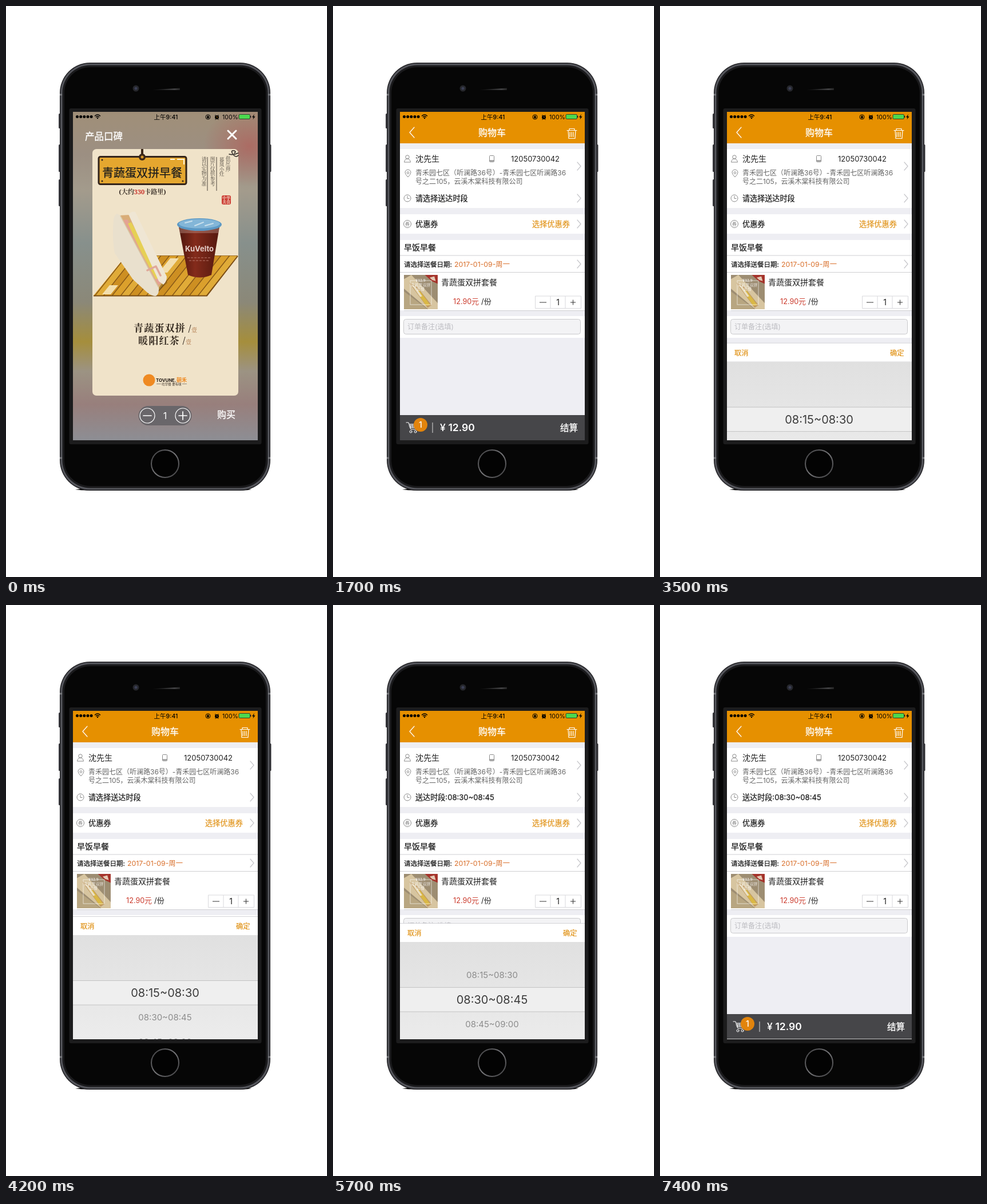
An HTML page for the animation above (7500 ms loop, 561 px wide and 998 px high).

```html
<!DOCTYPE html>
<html lang="zh-CN">
<head>
<meta charset="utf-8">
<title>购物车</title>
<style>
html, body { margin: 0; width: 100%; height: 100%; overflow: hidden; background: #fff; }
svg { display: block; width: 100vw; height: 100vh; }
text { font-family: Inter, "Noto Sans CJK SC", "Noto Sans CJK", sans-serif; white-space: pre; }
.serif { font-family: "Noto Serif", "Noto Serif CJK SC", "Noto Sans CJK SC", "Noto Sans CJK", serif; }
.mid { text-anchor: middle; }
.med { font-weight: 500; }
.bold { font-weight: 700; }
.white { fill: #fff; stroke: #fff; stroke-width: .3; }
.ink { fill: #1d1d1d; stroke: #1d1d1d; stroke-width: .25; }
.gold { fill: #e09114; stroke: #e09114; stroke-width: .2; }
.line { fill: none; stroke-linecap: round; stroke-linejoin: round; }
.icon { fill: none; stroke: #8b8b8b; stroke-width: 1; }
.down { writing-mode: vertical-rl; }
</style>
</head>
<body>
<svg viewBox="0 0 561 998">
<defs>
  <clipPath id="screen"><rect x="117" y="185" width="323" height="574"/></clipPath>
  <clipPath id="mat"><path d="M210 436H405L351 506H153Z"/></clipPath>
  <clipPath id="wheel"><rect x="117" y="577" width="323" height="182"/></clipPath>
  <linearGradient id="blur" x2="0" y2="1">
    <stop offset="0" stop-color="#a08f78"/><stop offset=".13" stop-color="#9c8f82"/>
    <stop offset=".24" stop-color="#a39b8c"/><stop offset=".4" stop-color="#87908c"/>
    <stop offset=".58" stop-color="#8b8878"/><stop offset=".7" stop-color="#a58e3c"/>
    <stop offset=".79" stop-color="#9c9383"/><stop offset=".89" stop-color="#987f7c"/>
    <stop offset="1" stop-color="#8d8e94"/>
  </linearGradient>
  <radialGradient id="rosy">
    <stop offset="0" stop-color="#b0605a" stop-opacity=".75"/><stop offset="1" stop-color="#b0605a" stop-opacity="0"/>
  </radialGradient>
  <linearGradient id="tan" x2="0" y2="1"><stop offset="0" stop-color="#b09d82"/><stop offset="1" stop-color="#ccb48e"/></linearGradient>
  <linearGradient id="drum" x2="0" y2="1"><stop offset="0" stop-color="#e0e0e0"/><stop offset="1" stop-color="#ececec"/></linearGradient>
  <linearGradient id="tea"><stop offset="0" stop-color="#4d160d"/><stop offset=".4" stop-color="#842b1b"/><stop offset="1" stop-color="#54190f"/></linearGradient>
  <linearGradient id="ring" x2="1" y2="1"><stop offset="0" stop-color="#3c3c3e"/><stop offset=".5" stop-color="#77777a"/><stop offset="1" stop-color="#3c3c3e"/></linearGradient>
  <linearGradient id="slit"><stop offset="0" stop-color="#111"/><stop offset=".8" stop-color="#444446"/><stop offset="1" stop-color="#222"/></linearGradient>
  <symbol id="snack" viewBox="0 0 100 100" preserveAspectRatio="none">
    <rect width="100" height="100" fill="#9d8d72"/>
    <path d="M0 12 22 0 100 82V100H72L0 40Z" fill="#d7c5a0"/>
    <path d="M0 48 70 100H0Z" fill="#b8a681"/>
    <path d="M15 22 40 36 82 88 70 96Z" fill="#c09a63"/>
    <path d="M30 38 48 48 78 88 66 90Z" fill="#d9b845"/>
    <path d="M22 28 34 34 54 62 48 64Z" fill="#eadfc4"/>
    <path d="M62 0H100V26L82 18Z" fill="#a5332b"/>
    <path d="M76 8 90 4 94 18 84 15Z" fill="#e4c9b4"/>
  </symbol>
  <path id="more" d="m-3-7 6 7-6 7" class="line" stroke="#c6c6ca" stroke-width="1.2"/>
</defs>

<!-- phone body -->
<g fill="#3c3c41">
  <rect x="92" y="188" width="4" height="26" rx="1.5"/><rect x="92" y="242" width="4" height="48" rx="1.5"/>
  <rect x="92" y="303" width="4" height="47" rx="1.5"/><rect x="459" y="242" width="4.5" height="48" rx="1.5"/>
</g>
<path d="M121 845q20-3 40 0-20 3-40 0M398 845q15-3 31 0-15 3-31 0" fill="#000"/>
<rect x="94" y="99" width="368" height="748" rx="53" fill="#1f1f22"/>
<rect x="95.500" y="100.500" width="365" height="745" rx="51.500" fill="#55565c"/>
<rect x="98.500" y="103.500" width="359" height="739" rx="48.500" fill="#1a1a1c"/>
<rect x="102" y="107" width="352" height="732" rx="45" fill="#060606"/>
<path d="M94 155h4M458 155h4M94 790h4M458 790h4" stroke="#77787c" stroke-width="3"/>
<rect x="110.500" y="179" width="336" height="587" rx="3" fill="#1c1c1d"/>
<circle cx="227" cy="144" r="5.500" fill="#26272c"/><circle cx="227" cy="144" r="2.500" fill="#3b3f55"/>
<path d="M255 146.500 304 143.500V147Z" fill="url(#slit)"/>
<circle cx="278" cy="800" r="24" fill="#030303" stroke="url(#ring)" stroke-width="2"/>

<g clip-path="url(#screen)">
  <g id="home">
    <rect x="117" y="185" width="323" height="574" fill="#fafafa"/>
    <path d="M117 185H440V500Q278 472 117 500Z" fill="url(#tan)"/>
    <text x="278" y="224" font-size="16.500" class="mid" fill="#fff">云溪市</text>
    <rect x="117" y="255" width="83" height="146" fill="#a2b497"/>
    <rect x="356" y="255" width="84" height="146" fill="#b79a78"/>
    <use href="#snack" x="214" y="242" width="128" height="172"/>
    <rect x="239" y="268" width="78" height="123" fill="none" stroke="#fff"/>
    <g class="mid" fill="#fff" font-size="16">
      <text x="278" y="274" class="serif">¥12.9</text>
      <text x="278" y="295" class="serif">青蔬蛋双拼</text>
      <text x="278" y="311" class="serif">套餐</text>
    </g>
    <text x="278" y="438" font-size="13" class="mid" fill="#fff">周一推荐: 青蔬蛋双拼套餐</text>
    <rect x="238" y="473" width="80" height="29" rx="14.500" fill="#f29a08"/>
    <text x="278" y="493" font-size="15" class="mid" fill="#fff">购买</text>
    <text x="263" y="531" font-size="12" fill="#c4281c">22份</text>
    <rect x="117" y="547" width="323" height="108" fill="#f0cf4f"/>
    <path d="M117 627q35-18 75 5t95-10 153 10V655H117Z" fill="#dcb437"/>
    <ellipse cx="251" cy="575" rx="25" ry="17" fill="#28282b"/>
    <g class="bold" stroke="#2a211c" stroke-width="6" paint-order="stroke" stroke-linejoin="round">
      <text x="186" y="611" font-size="29" fill="#d94a3a">小</text>
      <text x="214" y="611" font-size="29" fill="#f4d45a">钱</text>
      <text x="245" y="606" font-size="19" fill="#d98a62">变</text>
      <text x="264" y="611" font-size="29" fill="#f4d45a">大钱</text>
      <text x="186" y="627" font-size="16.500" fill="#fff3cd">充值<tspan fill="#ef9aa0">返现</tspan></text>
      <text x="253" y="630" font-size="24" fill="#d995b8">送好礼</text>
    </g>
    <rect x="117" y="659" width="323" height="58" fill="#e2a662"/>
    <path d="M117 659H440V683H245l-58-5-70 16Z" fill="#a8473a"/>
    <path d="M117 666H440" stroke="#4d766f" stroke-width="4" stroke-dasharray="5 2"/>
    <path d="M187 717v-28l22-5 20 33Z" fill="#eee1cb"/>
    <text x="229" y="713" font-size="25" class="serif bold" fill="#632615">包点</text>
    <rect x="117" y="717" width="323" height="42" fill="#f8f8f8"/>
    <path d="M271 726h14l2 5q-3 4-6 0-3 4-6 0-3 4-6 0zM272 733v7h12v-7" class="icon"/>
    <text x="278" y="752" font-size="9" class="mid" fill="#777">商城</text>
    <rect id="shade" x="117" y="185" width="323" height="574"/>
  </g>

  <g id="poster">
    <rect x="117" y="185" width="323" height="574" fill="url(#blur)"/>
    <ellipse cx="425" cy="245" rx="80" ry="70" fill="url(#rosy)"/>
    <text x="138" y="234" font-size="16.500" class="white">产品口碑</text>
    <path d="m388 218 14 14m0-14-14 14" class="line" stroke="#fff" stroke-width="3"/>
    <rect x="151" y="250" width="255" height="431" rx="7" fill="#f0e3c9"/>
    <path d="M238 250v15" stroke="#3b2718" stroke-width="4"/>
    <rect x="162" y="263.500" width="153" height="48" rx="3" fill="#e5a72f" stroke="#33241a" stroke-width="3"/>
    <circle cx="238" cy="264" r="6" fill="#3b2718"/><circle cx="238" cy="264" r="2.500" fill="#d89a2c"/>
    <path d="M287 268h8m4 0h12v9" fill="none" stroke="#fff6dd" stroke-width="2"/>
    <g fill="#33241a"><circle cx="168" cy="269" r="1.500"/><circle cx="168" cy="306" r="1.500"/><circle cx="309" cy="306" r="1.500"/></g>
    <text x="238" y="299" font-size="20" class="mid ink" stroke-linejoin="round">青蔬蛋双拼早餐</text>
    <text x="238.500" y="329" font-size="11" class="serif mid bold" fill="#3a3028">(大约<tspan fill="#c9332b">330</tspan>卡路里)</text>
    <path d="M352 264v59M368 264v59" stroke="#4a433b"/>
    <g font-size="8.600" fill="#4a433b">
      <text x="387" y="262" class="serif down">供应商:</text><text x="376" y="264" class="serif down">暮岚小灶</text>
      <text x="360" y="263" class="serif down">图片仅供参考</text><text x="345" y="263" class="serif down">请以实物为准</text>
    </g>
    <path d="M390 259q7 2 16-2m-10 1q-4-6 3-5 4 2 0 4m-1 4q5 4 8 0" class="line" stroke="#282420" stroke-width="1.500"/>
    <rect x="377" y="331" width="16" height="16" rx="3" fill="#cb3a31"/>
    <g font-size="7" class="bold mid" fill="#f7e5d0"><text x="385" y="338" class="serif">中华</text><text x="385" y="345" class="serif">美食</text></g>
    <g id="planks" clip-path="url(#mat)"></g>
    <path d="M153 506.500H351L405 437" fill="none" stroke="#7c4e15" stroke-width="2"/>
    <!-- sandwich -->
    <path d="M190 430 225 478 258 507 282 484 272 460Z" fill="#5a3a10" opacity=".35"/>
    <path d="M199 366 216 365 276 480 266 494Z" fill="#d9ad78"/>
    <path d="M205 374 212 373 272 482 266 488Z" fill="#e4a294"/>
    <path d="M213 380 219 378 270 472 262 478 236 430Z" fill="#e6d055"/>
    <path d="M214 364q6-6 12-4l55 113q0 9-6 14l-8-6Z" fill="#efe6d4"/>
    <path d="M188 374q1-9 6-11l6 3 67 126q1 13-6 15-7 0-15-7l-24-22-32-46q-5-27-2-58Z" fill="#e9e0cd"/>
    <path d="M200 367 266 491" class="line" stroke="#d8c6a4" stroke-width="1.500"/>
    <path d="m247 462 15-7 8 16" class="line" stroke="#e0a89a" stroke-width="3.500"/>
    <!-- cup -->
    <path d="M302 386H373L359 470q-20 9-41 0Z" fill="url(#tea)"/>
    <path d="M302 386H373L371 397H304Z" fill="#c49a8d" opacity=".4"/>
    <ellipse cx="338" cy="382" rx="39" ry="11" fill="#5b98c4"/>
    <ellipse cx="338" cy="380.500" rx="36" ry="8" fill="#83b6d8"/>
    <path d="m313 379 12-3m5 8 15-6m3 6 14-4" class="line" stroke="#c9e0ec" stroke-width="2"/>
    <text x="338" y="429" font-size="13" class="mid bold" fill="#e6cfc9">KuVelto</text>
    <path d="M317 440h40m-37 5h34" stroke="#b9796d" stroke-dasharray="4 2"/>
    <g fill="#33291f">
      <g font-size="17" letter-spacing="1.200" class="bold"><text x="223" y="569" class="serif">青蔬蛋双拼</text><text x="231" y="591" class="serif">暖阳红茶</text></g>
      <path d="m319 571 4-14m-14 35 4-14" stroke="#33291f"/>
      <g font-size="10" fill="#a96c3c"><text x="324" y="570" class="serif">壹</text><text x="314" y="591" class="serif">壹</text></g>
    </g>
    <circle cx="250" cy="654" r="10.500" fill="#ef8a22"/>
    <text x="262" y="657" font-size="7.800" class="bold" fill="#251d18">TOVUNE.</text>
    <text x="298" y="657" font-size="9" class="bold" fill="#ef8a22">朝禾</text>
    <path d="M263 660.500h8m37 0h8" stroke="#6f6254" stroke-width=".7"/>
    <text x="289.500" y="663" font-size="5.500" class="mid" fill="#40362c">吃早餐 要有味</text>
    <rect x="231.500" y="699" width="93" height="34" rx="17" fill="#69666a"/>
    <g class="line" stroke="#fff" stroke-width="1.200">
      <circle cx="247" cy="716" r="13"/><circle cx="309" cy="716" r="13"/>
      <path d="M240 716h14m48 0h14m-7-7v14" stroke-width="1.700"/>
    </g>
    <text x="278" y="722" font-size="16" class="mid" fill="#fff">1</text>
    <text x="369" y="720" font-size="16" class="white">购买</text>
  </g>

  <g id="cart">
    <rect x="117" y="185" width="323" height="574" fill="#eeeef3"/>
    <path d="M117 185H440V240H117Z" fill="#e69000"/>
    <g class="line" stroke="#fff" stroke-width="1.200">
      <path d="m142 212-8 9 8 9"/>
      <path d="M409 217.500h17m-15 0 1 14h11l1-14m-11 0v-3h9v3m-8 3v8m3-8v8m3-8v8"/>
    </g>
    <text x="278" y="227" font-size="16" class="mid white">购物车</text>
    <path d="M117 250H440V353H117ZM117 364H440V398H117ZM117 409H440V532H117ZM117 542H440V580H117Z" fill="#fff"/>
    <path d="M117 436H440M117 465.500H440M124 532.500H440" stroke="#cfcfd2"/>
    <g class="icon">
      <circle cx="130" cy="264" r="3.200"/><path d="M124.500 273q1-6 5.500-6t5.500 6z"/>
      <rect x="273.500" y="261.500" width="8" height="11" rx="1"/><path d="M273.500 270.500h8" stroke-width="2"/>
      <path d="M131 299q-5-5-5-8a5 5 0 0 1 10 0q0 3-5 8Z"/><circle cx="131" cy="291.500" r="1.800"/>
      <circle cx="130" cy="336" r="6"/><path d="M130 332v4.500h3.500"/>
      <circle cx="130" cy="381" r="6.500"/>
    </g>
    <text x="130" y="384" font-size="8" class="mid" fill="#777">券</text>
    <g fill="#222">
      <text x="144" y="272" font-size="14">沈先生</text>
      <text x="311" y="272" font-size="13">12050730042</text>
      <g font-size="12" fill="#666">
        <text x="144" y="296">青禾园七区（听澜路36号）-青禾园七区听澜路36</text>
        <text x="144" y="310.500">号之二105，云溪木棠科技有限公司</text>
      </g>
      <g class="ink">
        <text id="slot" x="144" y="341" font-size="13.100"></text>
        <text x="144" y="386" font-size="13.200">优惠券</text>
        <text x="124" y="427" font-size="14">早饭早餐</text>
        <text x="124" y="455.500" font-size="11.500">请选择送餐日期:</text>
      </g>
      <text x="348" y="386" font-size="13.200" class="gold">选择优惠券</text>
      <text x="212" y="456" font-size="12.300" fill="#d9702c">2017-01-09-周一</text>
      <text x="189" y="488" font-size="14">青蔬蛋双拼套餐</text>
      <text x="210" y="520.500" font-size="12.700" fill="#cb3a2c">12.90元</text>
      <text x="259" y="520.500" font-size="13">/份</text>
    </g>
    <use href="#more" x="430" y="280"/><use href="#more" x="430" y="336"/>
    <use href="#more" x="430" y="381"/><use href="#more" x="430" y="451"/>
    <use href="#snack" x="124" y="470" width="59" height="60"/>
    <rect x="135" y="480" width="37" height="42" fill="none" stroke="#fff" stroke-opacity=".75" stroke-width=".8"/>
    <g class="mid" fill="#fff" font-size="7"><text x="153" y="482" class="serif">¥12.9</text><text x="153" y="489.500" class="serif">青蔬蛋双拼</text><text x="153" y="496.500" class="serif">套餐</text></g>
    <path d="M353.500 507H433.500V528.500H353.500ZM380 507v21.500M406 507v21.500" fill="none" stroke="#d9d9dc"/>
    <path d="M361 518h12m42 0h9m-4.500-4.500v9" stroke="#333"/>
    <text x="393" y="523" font-size="14" class="mid" fill="#222">1</text>
    <rect x="123.500" y="547.500" width="309" height="26" rx="4" fill="#f3f3f5" stroke="#c9c9cc"/>
    <text x="130" y="565" font-size="12" fill="#bcbcc1">订单备注(选填)</text>
    <path d="M117 715H440V759H117Z" fill="#464649"/>
    <path id="edge" d="M117 758.500H440" stroke="#c8c8c8"/>
    <path d="M128 728h4l4 12h10m-13-9h13l-2 6h-10m-1-3h13m-10-3v6m3-6v6m3-6v6" class="line" stroke="#fff"/>
    <g class="line" stroke="#fff"><circle cx="136" cy="744" r="2"/><circle cx="144" cy="744" r="2"/></g>
    <circle cx="153" cy="732" r="12" fill="#e2840c"/>
    <text x="153" y="737" font-size="14" class="mid med" fill="#fff">1</text>
    <path d="M174 728v18" stroke="#ddd"/>
    <text x="187" y="743" font-size="17.500" class="med" fill="#fff">¥ <tspan font-weight="600">12.90</tspan></text>
    <text x="397" y="743" font-size="15.500" class="white">结算</text>
    <g id="loading">
      <rect x="234" y="429" width="90" height="86" rx="6" fill="#5a5a5a" fill-opacity=".87"/>
      <g id="spokes" class="line" stroke="#fff" stroke-width="2.600"></g>
      <text x="279" y="494" font-size="14" class="mid white">加载中...</text>
    </g>
  </g>

  <g id="picker">
    <path d="M117 544.500H440V577H117Z" fill="#fff"/><path d="M117 544.500H440" stroke="#d4d4d8"/>
    <g font-size="12.300" class="gold"><text x="130" y="566">取消</text><text x="402" y="566">确定</text></g>
    <path d="M117 577H440V759H117Z" fill="url(#drum)"/>
    <path d="M117 656.500H440V699H117Z" fill="#efefef"/>
    <path d="M117 656.500H440M117 699H440" stroke="#c3c3c3"/>
    <g id="rows" clip-path="url(#wheel)"></g>
  </g>

  <!-- status bar -->
  <g>
    <path d="M124.500 193.500h25" class="line" stroke="#000" stroke-width="5" stroke-dasharray="0 6.150"/>
    <g class="line" stroke="#000" stroke-width="1.500"><path d="M155.500 192q4.500-4 9 0m-7 2q2.500-2 5 0"/><circle cx="160" cy="196" r=".5"/></g>
    <text x="279.500" y="197.500" font-size="10.500" class="mid med">上午9:41</text>
    <circle cx="353" cy="194" r="4" fill="none" stroke="#000"/><path d="M351.500 193.500h3v2.500h-3zm.5 0v-1.500h2v1.500" stroke="#000" stroke-width=".6"/>
    <circle cx="368.500" cy="194.500" r="3.500"/><path d="m365 191.500 1.500-1m5.500 1-1.500-1m-4 7.500-1 1m5-1 1 1" stroke="#000"/>
    <path d="M368.500 192.500v2h1.500" stroke="#e69000" stroke-width=".7" fill="none"/>
    <text x="378" y="197.700" font-size="10.500">100%</text>
    <rect x="407" y="189.500" width="19.500" height="8" rx="1.500" fill="#4cd94e" stroke="#222" stroke-width=".8"/>
    <path d="M427.500 192v3" stroke="#222" stroke-width="1.500"/>
    <path d="m434 189-4 5.500h2.500l-1 4 4-5.500H433Z"/>
  </g>
</g>
</svg>
<script>
const $ = id => document.getElementById(id);
const LOOP = 7500, WIDTH = 323, DRUM = 215, PITCH = 43;
const times = ['08:15', '08:30', '08:45', '09:00', '09:15'];
const slots = times.slice(1).map((end, i) => `${times[i]}~${end}`);

const clamp = v => Math.min(1, Math.max(0, v));
const span = (t, start, length) => clamp((t - start) / length);
const easeOut = (u, power) => 1 - (1 - u) ** power;
const smooth = u => u * u * (3 - 2 * u);
const show = (id, on) => $(id).setAttribute('display', on ? 'inline' : 'none');
const move = (id, x, y) => $(id).setAttribute('transform', `translate(${x} ${y})`);

const tones = ['#dba02c', '#cd8f22', '#e0ab38'];
$('planks').innerHTML = Array.from({ length: 15 }, (_, i) => {
  const x = 196 + i * 15;
  return `<path d="M${x} 436h15l-56 71h-15z" fill="${tones[i * 2 % 3]}" stroke="#8a5a18" stroke-width="1.4"/>`;
}).join('') + '<path d="M181 488h15l-13 16h-15zM234 455h15l-13 16h-15zM287 441h15l-20 25h-15z" fill="#f3dfae"/>';

$('spokes').innerHTML = Array.from({ length: 12 }, (_, i) =>
  `<path d="M278 455v-7" transform="rotate(${i * 30} 278 462)"/>`).join('');
$('rows').innerHTML = slots.map(s => `<text x="278" class="mid">${s}</text>`).join('');

function draw(ms) {
  const step = Math.floor((Math.floor(ms / 100) / 10 + 1 / 60) * 6);
  const t = step / 6 + 1 / 30;

  const push = easeOut(span(t, 0.3575, 0.5), 3);
  show('poster', t < 0.3);
  move('home', -0.3 * WIDTH * push, 0);
  $('shade').setAttribute('opacity', 0.1 * push);
  move('cart', WIDTH * (1 - push), 0);

  show('loading', t < 1.3);
  [...$('spokes').children].forEach((spoke, i) =>
    spoke.setAttribute('opacity', 0.25 + 0.75 * ((i + 24 - Math.floor(t * 12) % 12) % 12) / 11));

  const raised = easeOut(span(t, 3.37, 0.3), 2) - smooth(span(t, 5.65, 0.35));
  show('picker', raised > 0);
  move('picker', 0, DRUM * (1 - raised));

  const pos = smooth(span(t, 4.45, 0.85));
  [...$('rows').children].forEach((row, i) => {
    const chosen = Math.round(pos) === i, size = chosen ? 20 : 15;
    row.setAttribute('y', 677.7 + PITCH * (i - pos) + size * 0.36);
    row.setAttribute('font-size', size);
    row.setAttribute('fill', chosen ? '#3c3c3c' : '#8c8c8c');
  });

  $('slot').textContent = t < 5.65 ? '请选择送达时段' : `送达时段:${slots[1]}`;
  show('edge', t > 5.95);
}

const begin = performance.now();
function tick() {
  draw((performance.now() - begin) % LOOP);
  requestAnimationFrame(tick);
}
tick();
</script>
</body>
</html>
```
